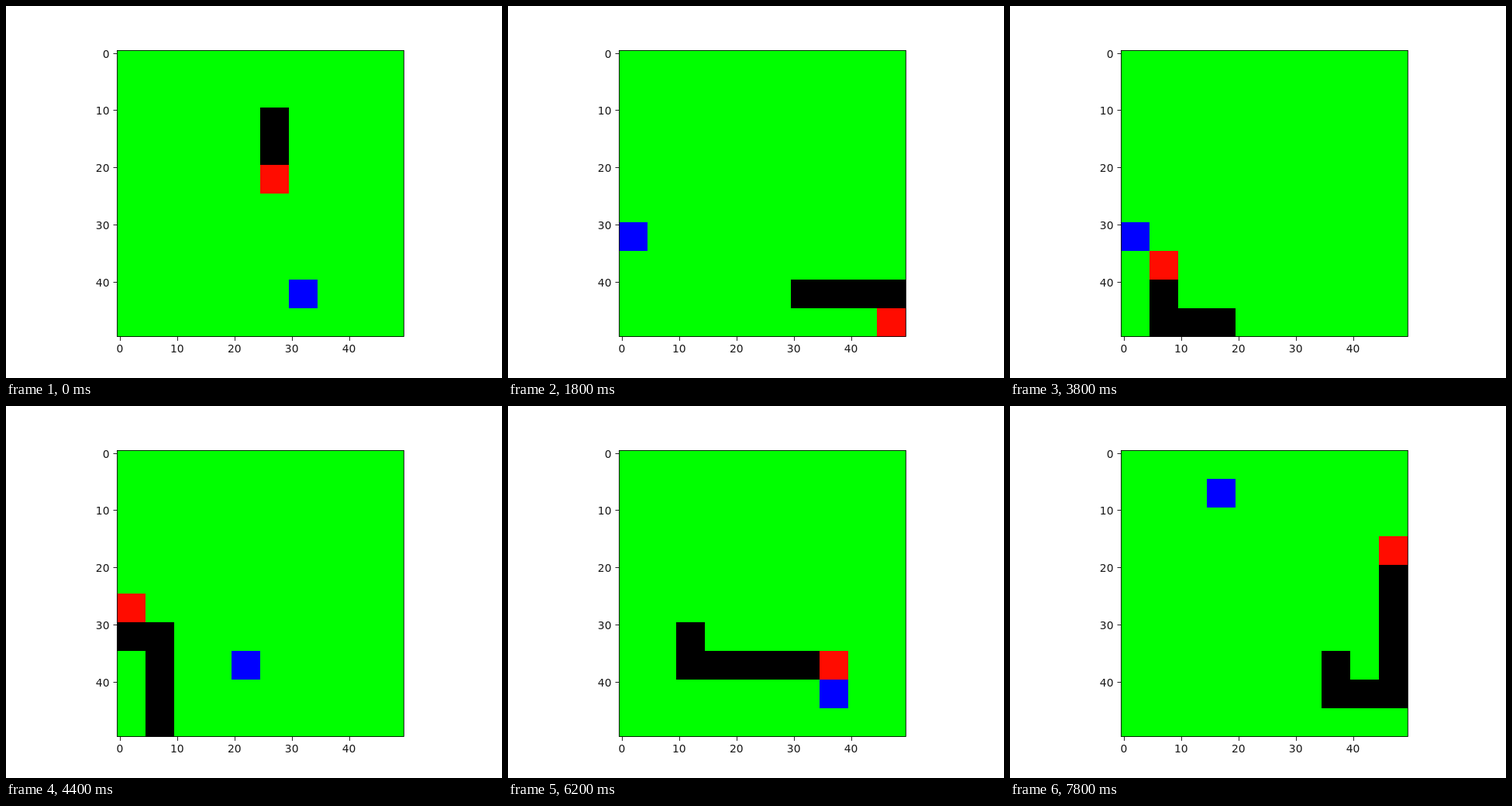
An HTML page with a canvas for the animation above (8 s loop, 640 by 480 pixels).

```html
<!DOCTYPE html>
<html lang="en">
<head>
<meta charset="utf-8">
<title>Snake plot</title>
<style>
  html, body { margin: 0; width: 100%; height: 100%; overflow: hidden; background: #fff; }
  canvas { display: block; width: 640px; height: 480px; }
</style>
</head>
<body>
<canvas width="640" height="480"></canvas>
<script>
const ctx = document.querySelector('canvas').getContext('2d');
const STEP = 200, STEPS = 40, CELL = 37, LEFT = 143, TOP = 57;
const START_LENGTH = 3, TICK_GAP = 73.92;

// Route of the head, starting at the tail of the first pose.
const route = [[5, 2]];
const moves = 'D6 R4 D1 L8 U3 L1 U1 R2 D2 R5 D1 R2 U5';
const directions = { U: [0, -1], D: [0, 1], L: [-1, 0], R: [1, 0] };
for (const [dir, count] of moves.split(' ')) {
  const [dx, dy] = directions[dir];
  for (let i = 0; i < +count; i++) {
    const [x, y] = route[route.length - 1];
    route.push([x + dx, y + dy]);
  }
}

// Each food lies on the board until the step at which it is eaten.
const foods = [
  { cell: [6, 8], eaten: 5 },
  { cell: [9, 9], eaten: 9 },
  { cell: [0, 6], eaten: 21 },
  { cell: [4, 7], eaten: 28 },
  { cell: [7, 8], eaten: 32 },
  { cell: [9, 3], eaten: 39 },
  { cell: [3, 1], eaten: Infinity }
];

function fillCell([x, y], color) {
  ctx.fillStyle = color;
  ctx.fillRect(LEFT + x * CELL, TOP + y * CELL, CELL, CELL);
}

function line(x1, y1, x2, y2) {
  ctx.beginPath();
  ctx.moveTo(x1, y1);
  ctx.lineTo(x2, y2);
  ctx.stroke();
}

function drawAxes() {
  ctx.strokeStyle = '#000';
  ctx.fillStyle = '#1a1a1a';
  ctx.lineWidth = 0.85;
  ctx.strokeRect(143.5, 57.5, 370, 369);
  ctx.font = '13.89px "DejaVu Sans", sans-serif';
  for (let i = 0; i < 5; i++) {
    const x = 146.9 + i * TICK_GAP;
    const tickX = Math.round(x) + 0.5;
    const tickY = Math.floor(61.04 + i * TICK_GAP) + 0.5;
    line(tickX, 427, tickX, 432);
    line(138.5, tickY, 143, tickY);
    ctx.textAlign = 'center';
    ctx.fillText(i * 10, x, 447);
    ctx.textAlign = 'right';
    ctx.fillText(i * 10, 133.5, tickY + 5.5);
  }
}

function draw(step) {
  ctx.fillStyle = '#fff';
  ctx.fillRect(0, 0, 640, 480);
  ctx.fillStyle = '#0f0';
  ctx.fillRect(LEFT, TOP, CELL * 10, CELL * 10);

  const length = START_LENGTH + foods.filter(f => f.eaten <= step).length;
  const head = step + START_LENGTH - 1;
  route.slice(head - length + 1, head).forEach(cell => fillCell(cell, '#000'));
  fillCell(foods.find(f => f.eaten > step).cell, '#00f');
  fillCell(route[head], '#ff0c00');
  drawAxes();
}

function tick() {
  draw(Math.floor(performance.now() / STEP) % STEPS);
  requestAnimationFrame(tick);
}
tick();
</script>
</body>
</html>
```
